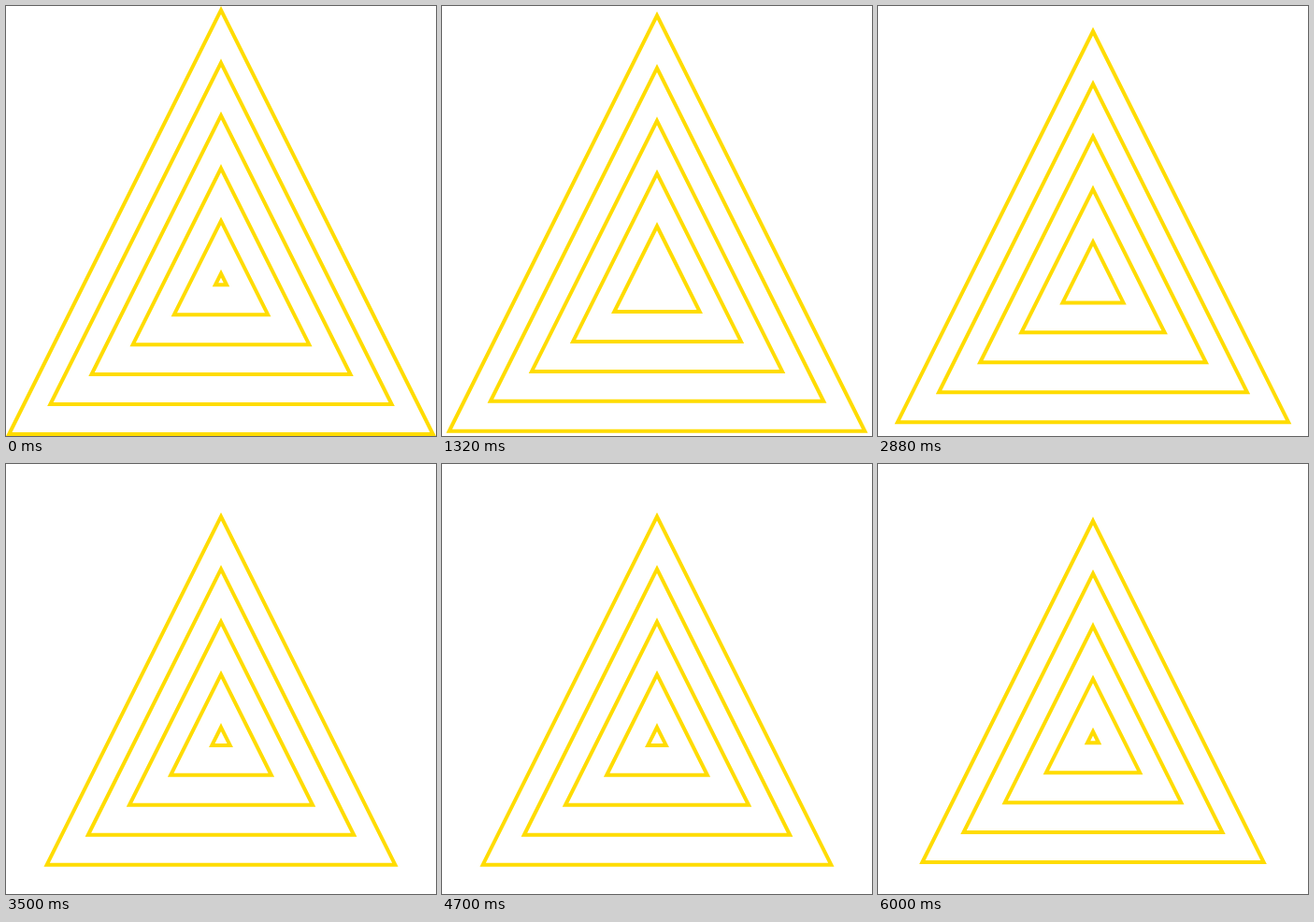
Recreate the animation shown at these times as an HTML page with a canvas. Size 460 px wide and 460 px high, loop 6.02 s.

```html
<!DOCTYPE html>
<html lang="en">
<head>
<meta charset="utf-8">
<title>Shrinking triangles</title>
<style>
  html, body { margin: 0; width: 100%; height: 100%; overflow: hidden; background: #fff; }
  canvas { display: block; }
</style>
</head>
<body>
<canvas id="stage" width="460" height="460"></canvas>
<script>
const ctx = document.getElementById('stage').getContext('2d');
const TICK = 20, TICKS = 301;   // one loop is 6020 ms
const GAP = 60, LIFE = 300;     // in ticks: time between births, lifespan
const start = performance.now();

ctx.strokeStyle = '#ffdc00';
ctx.lineWidth = 4;
ctx.lineJoin = 'miter';

// Each triangle shrinks linearly, always twice as steep as it is wide.
function triangle(age) {
  const k = age / GAP;
  const half = 226.76 - 44.15 * k;
  const top = 4.47 + 56.35 * k;
  const bottom = top + 2 * half;
  ctx.beginPath();
  ctx.moveTo(230, top);
  ctx.lineTo(230 + half, bottom);
  ctx.lineTo(230 - half, bottom);
  ctx.closePath();
  ctx.stroke();
}

function draw(now) {
  const tick = Math.floor(Math.max(0, now - start) / TICK) % TICKS;
  ctx.clearRect(0, 0, 460, 460);
  for (let i = -5; i < 5; i++) {
    const age = tick - i * GAP;
    if (age >= 0 && age <= LIFE) triangle(age);
  }
  requestAnimationFrame(draw);
}
draw(start);
</script>
</body>
</html>
```
